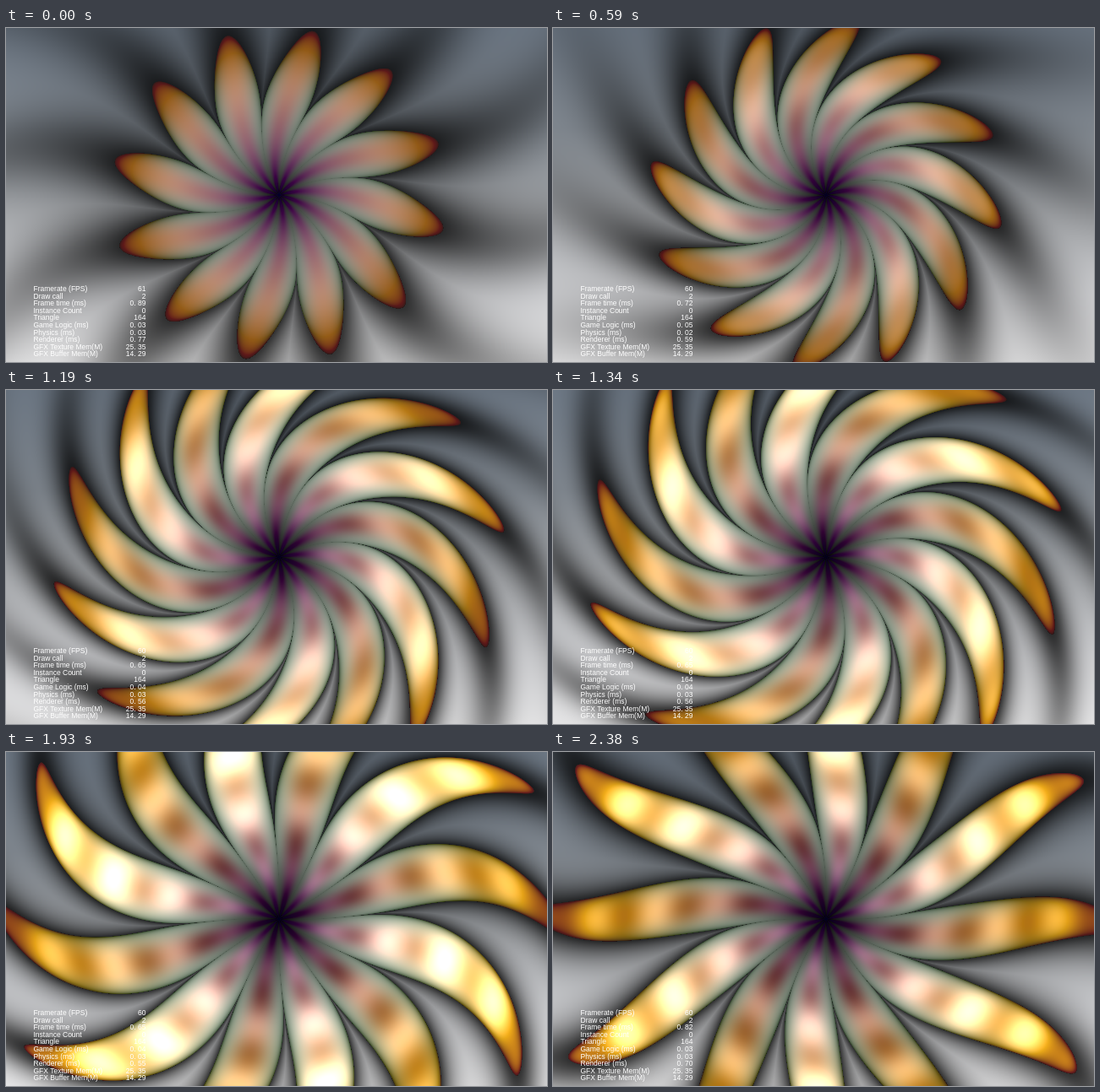
Write an HTML page with a canvas that moves like this. It is 640 px wide and 396 px high and loops after 2.48 s.

```html
<!DOCTYPE html>
<html lang="en">
<head>
<meta charset="utf-8">
<title>Swirling flower</title>
<style>
  html, body { margin: 0; width: 100%; height: 100%; overflow: hidden; background: #000; }
  canvas, svg { position: absolute; left: 0; top: 0; width: 100%; height: 100%; display: block; }
  text { font: 8.5px "Liberation Sans", Arial, sans-serif; fill: #fff; white-space: pre; }
</style>
</head>
<body>
<canvas id="flower" width="640" height="396"></canvas>
<svg id="stats" viewBox="0 0 640 396" preserveAspectRatio="none"></svg>
<script>
const W = 640, H = 396, LOOP = 2480;
const CENTER = { x: 323, y: 198 }, UNIT = 350;
const STEPS = [0, 150, 300, 450, 590, 740, 890, 1040, 1190, 1340, 1490,
               1640, 1780, 1930, 2080, 2230, 2380];

// Backdrop: position down the stage, then colour
const SKY = [
  [0, 120, 132, 146], [0.3, 145, 153, 162], [0.55, 190, 193, 197],
  [0.8, 232, 233, 236], [1, 252, 252, 253]
];

const LABELS = ['Framerate (FPS)', 'Draw call', 'Frame time (ms)', 'Instance Count', 'Triangle',
  'Game Logic (ms)', 'Physics (ms)', 'Renderer (ms)', 'GFX Texture Mem(M)', 'GFX Buffer Mem(M)'];

// Start time, frame rate, frame time, logic, physics, renderer
const READINGS = [
  [0, '61', '0. 89', '0. 03', '0. 03', '0. 77'],
  [450, '60', '0. 72', '0. 05', '0. 02', '0. 59'],
  [1040, '60', '0. 65', '0. 04', '0. 03', '0. 56'],
  [1490, '60', '0. 65', '0. 04', '0. 03', '0. 55'],
  [2080, '60', '0. 82', '0. 03', '0. 03', '0. 70']
];

const ctx = document.getElementById('flower').getContext('2d');
const image = ctx.createImageData(W, H);
const stats = document.getElementById('stats');

function addText(x, y, content, anchor) {
  const node = document.createElementNS('http://www.w3.org/2000/svg', 'text');
  node.setAttribute('x', x);
  node.setAttribute('y', y);
  node.setAttribute('text-anchor', anchor);
  node.textContent = content;
  stats.appendChild(node);
  return node;
}

const values = LABELS.map((label, i) => {
  const y = 312.2 + i * 8.55;
  addText(32.5, y, label, 'start');
  return addText(165.5, y, '', 'end');
});

function skyAt(v) {
  let i = 1;
  while (i < SKY.length - 1 && SKY[i][0] < v) i++;
  const a = SKY[i - 1], b = SKY[i], k = (v - a[0]) / (b[0] - a[0]);
  return [1, 2, 3].map(c => a[c] + (b[c] - a[c]) * k);
}

const sky = Array.from({ length: H }, (_, y) => skyAt(y / (H - 1)));

// Polar coordinates never change, so compute them once
const radius = new Float32Array(W * H), angle = new Float32Array(W * H);
for (let y = 0, i = 0; y < H; y++) {
  for (let x = 0; x < W; x++, i++) {
    const dx = x + 0.5 - CENTER.x, dy = y + 0.5 - CENTER.y;
    radius[i] = Math.hypot(dx, dy) / UNIT;
    angle[i] = Math.atan2(dx, dy);
  }
}

function drawFlower(t) {
  const phase = 3.88 + 1.96 * t, turn = 2.25 - 0.57 * t;
  const contrast = 0.25 * Math.min(1, 0.15 + 0.5 * t);
  const spots = 0.175 * Math.min(1, 0.1 + 0.55 * t);
  const gamma = Math.min(0.95, 0.8 + 0.1 * t);
  const tone = v => v > 0 ? 255 * Math.pow(v, gamma) : 0;
  const px = image.data;

  for (let i = 0, o = 0; i < radius.length; i++, o += 4) {
    const r = radius[i];
    const wave = Math.cos(phase - 2 * r);
    const swirl = 12 * angle[i] - 7 * wave + 8 * r - turn;
    const h = 0.5 + 0.5 * Math.cos(swirl);
    const edge = 0.25 + 0.75 * Math.pow(h, r) * (0.7 + 0.3 * wave);

    if (r < edge) {
      let c = Math.sqrt(1 - Math.pow(r / edge, 1.25)) * r * 2.5;
      c *= 1.25 + contrast * Math.cos(swirl / 2);
      c *= 1 - h * (0.175 + spots * Math.sin(30 * r));
      c *= 0.7 + 0.3 * h;
      const glow = 0.1 * r;
      px[o] = tone(c + glow);
      px[o + 1] = tone(Math.max(0, c - 0.5 * h + 0.2 * r + 0.35 * h * (1 - r)) + glow);
      px[o + 2] = tone(Math.max(0, c - h * r + 0.1 * h * (1 - r)) + glow);
    } else {
      const light = 0.2 + 0.8 * (1 - Math.exp(-2.6 * (r - edge)));
      const back = sky[(i / W) | 0];
      for (let c = 0; c < 3; c++) px[o + c] = back[c] * light;
    }
    px[o + 3] = 255;
  }
  ctx.putImageData(image, 0, 0);
}

function drawStats(ms) {
  const [, fps, frame, logic, physics, renderer] = READINGS.filter(row => row[0] <= ms).pop();
  [fps, '2', frame, '0', '164', logic, physics, renderer, '25. 35', '14. 29']
    .forEach((value, i) => { values[i].textContent = value; });
}

let shown = -1;
function tick() {
  const now = performance.now() % LOOP;
  const step = STEPS.filter(s => s <= now).pop();
  if (step !== shown) {
    shown = step;
    drawFlower(step / 1000);
    drawStats(step);
  }
  requestAnimationFrame(tick);
}
tick();
</script>
</body>
</html>
```
